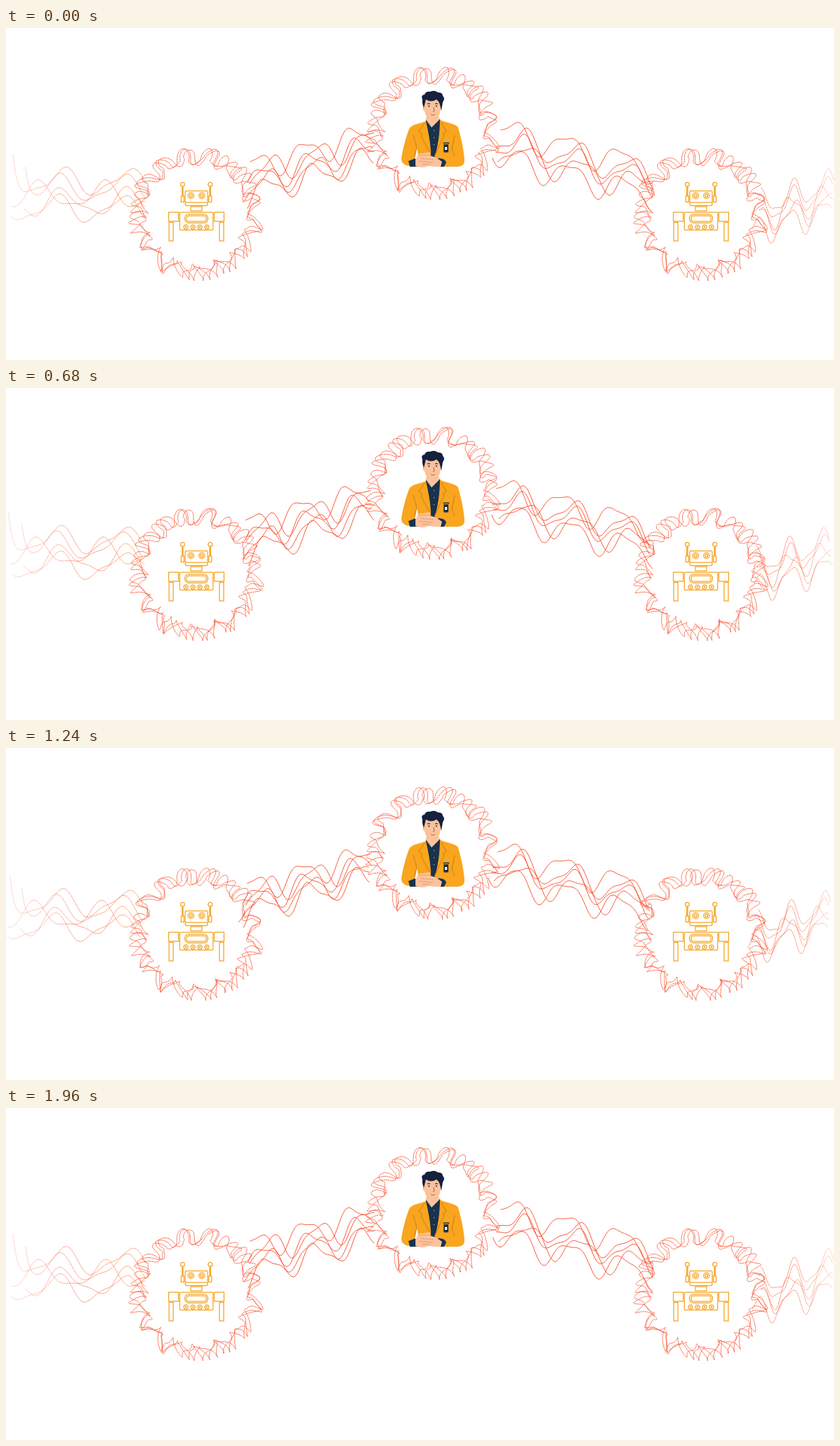
Recreate the animation shown at these times as an HTML page. Size 1183 by 474 pixels, loop 2 s.

```html
<!DOCTYPE html>
<html lang="en">
<head>
<meta charset="utf-8">
<title>Connected agents</title>
<style>
  html, body { margin: 0; width: 100%; height: 100%; overflow: hidden; background: #fff; }
  svg { display: block; width: 100vw; height: 100vh; }
  .waves, .rings { fill: none; stroke: #f9502f; stroke-linejoin: round; }
  .waves { stroke-width: .95; }
  .rings { stroke-width: .85; stroke-dasharray: 2.4 .5; }
  .tail { stroke-width: .85; stroke-dasharray: 2 .8; }
  .robot { fill: none; stroke: #f5a31f; stroke-width: 1.25; }
</style>
</head>
<body>
<svg viewBox="0 0 1183 474">
  <defs>
    <linearGradient id="fadeLeft" gradientUnits="userSpaceOnUse" x1="8" x2="205">
      <stop offset="0" stop-color="#f9502f" stop-opacity=".35"/>
      <stop offset=".5" stop-color="#f9502f" stop-opacity=".85"/>
      <stop offset="1" stop-color="#f7822a"/>
    </linearGradient>
    <linearGradient id="fadeRight" gradientUnits="userSpaceOnUse" x1="1070" x2="1183">
      <stop offset="0" stop-color="#f9602c"/>
      <stop offset=".5" stop-color="#f9502f" stop-opacity=".85"/>
      <stop offset="1" stop-color="#f9502f" stop-opacity=".4"/>
    </linearGradient>
    <path id="ring"/>
    <g id="robot" class="robot">
      <g id="side">
        <circle cx="252.3" cy="223.3" r="2.9"/>
        <path d="M251.6 226.5V240M253 226.5V240"/>
        <rect x="250.3" y="240" width="4" height="8.5"/>
        <rect x="232.5" y="263" width="14" height="13"/>
        <rect x="233" y="277.5" width="6" height="26.5"/>
        <circle cx="264.2" cy="239.3" r="4.2"/>
        <circle cx="264.2" cy="239.3" r="2"/>
        <g id="knob">
          <circle cx="257" cy="284" r="3"/>
          <circle cx="257" cy="284" r=".6"/>
        </g>
        <use href="#knob" x="10"/>
      </g>
      <use href="#side" transform="matrix(-1 0 0 1 544 0)"/>
      <rect x="256" y="232.5" width="32" height="16.5" rx="1.5"/>
      <path d="M256 249V251.5Q256 253.5 259 253.5H285Q288 253.5 288 251.5V249"/>
      <rect x="264" y="255" width="16" height="6"/>
      <rect x="248.3" y="263" width="47.5" height="25.3" rx="1"/>
      <rect x="255.5" y="265.8" width="33" height="12.5" rx="6"/>
      <rect x="257.8" y="268" width="28.4" height="8.2" rx="4"/>
    </g>
  </defs>

  <g class="waves">
    <path id="tailLeft" class="tail" stroke="url(#fadeLeft)"/>
    <path id="linkLeft"/>
    <path id="linkRight"/>
    <path id="tailRight" class="tail" stroke="url(#fadeRight)"/>
  </g>
  <g class="rings">
    <use href="#ring" x="272" y="266"/>
    <use href="#ring" x="610" y="150"/>
    <use href="#ring" x="993" y="266"/>
  </g>
  <use href="#robot"/>
  <use href="#robot" x="721"/>

  <g id="man">
    <path fill="#fbc39b" d="M601 124H618L621 136L609 147L599 136Z"/>
    <path fill="#19324d" d="M600 131L608 142L620 130L624 142L616 190H608L600 146Z"/>
    <path fill="#f9a51d" d="M600 133C590 137 580 137 576 144C571 157 567 172 565 185Q564 195 576 197L585 184L587 171L589 182L607 187C608 171 604 151 600 133ZM620 131C630 136 642 136 646 142C650 156 654 173 655 188Q656 197 646 198H627L612 186C617 170 620 150 620 131Z"/>
    <path fill="none" stroke="#c87918" stroke-width=".9" d="M598 136L590 148L595 151L593 154L607 181M622 135L629 148L624 151L626 154L612 183M582 153L587 171L583 184M641 153L637 173L641 183"/>
    <path fill="#fbc39b" d="M597 104Q609 96 620 104L621 116Q620 128 610 132Q600 129 598 119Q594 117 596 110Z"/>
    <path fill="#16203f" d="M597 114Q594 107 595 102Q592 96 598 95Q600 90 606 91Q612 88 617 92Q624 92 624 97Q628 100 624 106L622 118L620 110Q619 105 615 102Q607 107 600 102Z"/>
    <path fill="none" stroke="#16203f" stroke-width="1.2" d="M602 108.5Q604 107 606 108.5M613 108.5Q615 107 617 108.5"/>
    <circle cx="604.3" cy="111.5" r="1" fill="#16203f"/>
    <circle cx="615" cy="111.5" r="1" fill="#16203f"/>
    <path fill="none" stroke="#ad5b3d" stroke-width=".9" d="M611 113L612 119H610M607 123.5Q610 125.5 613 123.5"/>
    <path fill="none" stroke="#e8f0f5" d="M611.5 146v30" stroke-dasharray="1 9"/>
    <path fill="#19324d" d="M575 190L585 186L588 198H577ZM616 186Q627 185 629 192L626 198H616Z"/>
    <path fill="#fbc39b" d="M585 188Q588 178 596 179L604 177Q608 179 605 182L615 185L623 191L621 198H612L604 197Q594 201 585 197Z"/>
    <path fill="none" stroke="#dc9370" stroke-width=".8" d="M589 182L605 181M592 186L611 188M590 190L610 192M594 195L606 194"/>
    <path fill="#19324d" d="M624.5 163.5h9v1.5h-9zM625.3 166h6.8v11.5h-6.8z"/>
    <rect x="627" y="170" width="3.2" height="4" fill="#fff"/>
  </g>
</svg>

<script>
const LOOP = 1000, STEP = 40, TAU = Math.PI * 2, STRANDS = 5;

// Each bundle runs along a slope; `crest` is the x of one wave top.
const bundles = {
  tailLeft:  { x1: 10,   y1: 238, x2: 200,  y2: 238, crest: 62,   length: 93, height: 17, gap: 9, flare: 42 },
  linkLeft:  { x1: 336,  y1: 222, x2: 528,  y2: 168, crest: 432,  length: 68, height: 17, gap: 9 },
  linkRight: { x1: 693,  y1: 162, x2: 926,  y2: 219, crest: 731,  length: 76, height: 18, gap: 9 },
  tailRight: { x1: 1068, y1: 272, x2: 1183, y2: 240, crest: 1122, length: 47, height: 18, gap: 9 }
};

const random = seed => {
  const v = Math.sin(seed * 12.9898) * 43758.5453;
  return v - Math.floor(v);
};
const point = (x, y) => `${x.toFixed(2)} ${y.toFixed(2)}`;

// Every point of a strand circles on a small ellipse.
function strandPath(b, i, turn) {
  const swing = turn + i * 0.3;
  const seed = i + b.x1;
  const shift = (random(seed) - 0.5) * b.length * 0.45;
  const ripple = random(seed + 7) * TAU;
  const start = b.x1 + (b.flare ? i % 2 * 18 : random(seed + 3) * 14);
  const points = [];
  for (let x = start; x <= b.x2; x += 2) {
    const slope = b.y1 + (b.y2 - b.y1) * (x - b.x1) / (b.x2 - b.x1);
    const wave = b.height * Math.cos(TAU * (x - b.crest - shift) / b.length)
      + b.height * 0.35 * Math.sin(TAU * x / (b.length * 0.53) + ripple);
    const flare = b.flare && i < 2 ? b.flare * Math.exp((start - x) / 5) : 0;
    const y = slope + (i - 2) * b.gap - wave - flare;
    points.push(point(x + 4.5 * (Math.cos(swing) - 1), y + 2.5 * Math.sin(swing)));
  }
  return "M" + points.join("L");
}

// A triangle wave with slightly rounded tips.
const spike = phase => Math.asin(0.97 * Math.cos(phase)) / Math.asin(0.97);

// Three spiky outlines sway around the circle, their tips bent sideways.
function ringPath(turn) {
  const spikes = 16, samples = spikes * 20;
  let d = "";
  for (let k = 0; k < 3; k++) {
    const points = [];
    for (let i = 0; i < samples; i++) {
      const a = i / samples * TAU;
      const phase = spikes * a + Math.PI + (k - 1) * 1.1 + 0.4 * Math.sin(5 * a + 2 * k);
      const rise = spike(phase);
      const r = 82 + (11.5 + 2 * Math.sin(7 * a + k)) * rise + 2.5 * Math.sin(2 * phase + k);
      const bend = 0.06 * rise * Math.sin(3 * a + k) + 0.03 * Math.sin(2 * phase + a);
      const sway = 0.03 * Math.sin(turn + 3 * a + k);
      const angle = a + bend + sway;
      points.push(point(r * Math.sin(angle), -r * Math.cos(angle)));
    }
    d += "M" + points.join("L") + "Z";
  }
  return d;
}

const setPath = (id, d) => document.getElementById(id).setAttribute("d", d);

function draw(now) {
  const turn = Math.floor(now / STEP) * STEP % LOOP / LOOP * TAU;
  for (const [id, bundle] of Object.entries(bundles)) {
    const strands = Array.from({ length: STRANDS }, (_, i) => strandPath(bundle, i, turn));
    setPath(id, strands.join(""));
  }
  setPath("ring", ringPath(turn));
}

const start = performance.now();
function tick() {
  draw(performance.now() - start);
  requestAnimationFrame(tick);
}
tick();
</script>
</body>
</html>
```
